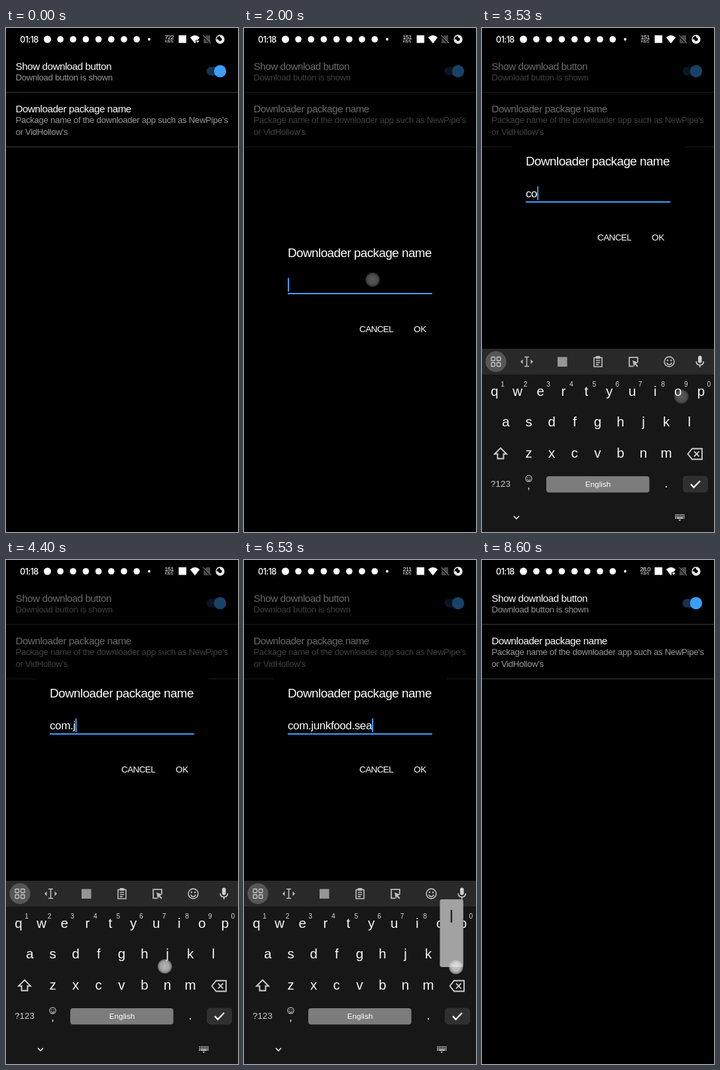
An HTML page with a canvas that plays this animation: 350x759 px, repeating every 8990 ms.

```html
<!DOCTYPE html>
<html lang="en">
<head>
<meta charset="utf-8">
<title>Downloader package name</title>
<style>
html, body { margin: 0; width: 100%; height: 100%; overflow: hidden; background: #000; }
canvas { display: block; width: 350px; height: 759px; }
</style>
</head>
<body>
<canvas id="stage"></canvas>
<script>
const W = 350, H = 759, LOOP = 8990, STEP = 1000 / 15;
const SANS = '"Liberation Sans", Arial, sans-serif';
const BLUE = '#3d9dfa';
const canvas = document.getElementById('stage');
const ctx = canvas.getContext('2d');
const dpr = window.devicePixelRatio || 1;
canvas.width = W * dpr;
canvas.height = H * dpr;

const clamp = v => Math.max(0, Math.min(1, v));
const easeOut = v => 1 - Math.pow(1 - clamp(v), 3);
const easeInOut = v => { v = clamp(v); return v * v * (3 - 2 * v); };

function text(str, x, y, size, color, { gap = 0, align = 'left', font = SANS, weight = 400 } = {}) {
  ctx.font = `${weight} ${size}px ${font}`;
  ctx.letterSpacing = gap + 'px';
  ctx.textAlign = align;
  ctx.fillStyle = color;
  ctx.fillText(str, x, y);
}
function rect(x, y, w, h, color, r = 0) {
  ctx.fillStyle = color;
  ctx.beginPath();
  ctx.roundRect(x, y, w, h, r);
  ctx.fill();
}
function circle(x, y, r, color) {
  ctx.fillStyle = color;
  ctx.beginPath();
  ctx.arc(x, y, r, 0, 7);
  ctx.fill();
}
function arc(x, y, r, from, to, color, width) {
  ctx.lineWidth = width;
  ctx.strokeStyle = color;
  ctx.beginPath();
  ctx.arc(x, y, r, from, to);
  ctx.stroke();
}
function shape(d, x, y, color, width = 0) {
  ctx.save();
  ctx.translate(x, y);
  ctx.lineWidth = width;
  ctx.strokeStyle = ctx.fillStyle = color;
  const path = new Path2D(d);
  width ? ctx.stroke(path) : ctx.fill(path);
  ctx.restore();
}

// Key centres
const PITCH = 34.6;
const keyPos = {};
[['qwertyuiop', 19, 547], ['asdfghjkl', 36, 593], ['zxcvbnm', 70.5, 640]].forEach(([row, x, y]) =>
  [...row].forEach((ch, i) => { keyPos[ch] = { x: x + i * PITCH, y }; }));
keyPos['.'] = { x: 278, y: 687 };

// Key, press time, release time, finger offset
const presses = [
  ['c', 3140, 3260, 2, 9], ['o', 3370, 3470, 5, 8], ['m', 3540, 3650, 0, 10], ['.', 3730, 3850, 2, 7],
  ['j', 4230, 4390, -4, 19], ['u', 4405, 4470, 0, 12], ['n', 4480, 4560, -2, 9], ['k', 4570, 4650, 2, 12],
  ['f', 5060, 5270, -4, 4], ['o', 5220, 5330, 7, 4], ['o', 5400, 5470, 7, 5], ['d', 5475, 5560, -2, 8],
  ['.', 5630, 5715, 2, 7], ['s', 5850, 5930, -2, 8], ['e', 5990, 6080, 2, 9], ['a', 6180, 6280, -11, 7],
  ['l', 6340, 6700, 7, 20]
].map(([ch, down, up, dx, dy]) => ({ ch, down, up, x: keyPos[ch].x + dx, y: keyPos[ch].y + dy }));

const taps = [
  { x: 53, y: 151, down: 1060, up: 1220 },
  { x: 194, y: 379, down: 1790, up: 1945 },
  { x: 280, y: 334, down: 7790, up: 7970 }
];

function touch({ x, y, down, up }, t) {
  if (t < down || t > up + 100) return;
  const a = t < up ? 1 : 1 - (t - up) / 100;
  const g = ctx.createRadialGradient(x, y, 0, x, y, 11.5);
  g.addColorStop(0, `rgba(240,240,240,${0.82 * a})`);
  g.addColorStop(0.62, `rgba(225,225,225,${0.76 * a})`);
  g.addColorStop(0.85, `rgba(200,200,200,${0.62 * a})`);
  g.addColorStop(1, 'rgba(180,180,180,0)');
  circle(x, y, 11.5, g);
}

function statusBar(t) {
  text('01:18', 21, 21.5, 12.8, '#fff', { gap: -0.6, font: 'Inter, sans-serif', weight: 500 });
  circle(62.5, 17, 5.5, '#fff');
  for (let i = 0; i < 7; i++) circle(82 + i * 19.2, 17, 4.8, '#fff');
  circle(216, 17, 1.9, '#fff');

  const speed = t < 1930 ? '722' : t < 4930 ? '151' : t < 7990 ? '211' : '28.0';
  text(speed, 246, 17, 9.4, '#fff', { align: 'center', gap: -0.7 });
  text('KB/S', 246, 22.4, 5.8, '#eee', { align: 'center', gap: -0.2 });

  rect(260.5, 11, 11.5, 11.5, '#fff');

  shape('M0 6.2 L-7.2 -2.8 Q0 -9.2 7.2 -2.8 Z', 285, 17, '#fff');
  const active = t < 395 || (t > 530 && t < 730) || (t > 3330 && t < 3530) || t > 8190;
  if (active) {
    rect(286, 18, 6.5, 6, '#000');
    shape('M-2.6 -2 H2.6 L0 1.6 Z', 289, 21, '#fff');
  }

  shape('M-5 -1 L-0.5 -6 H5 V6 H-5 Z', 303, 17, '#484848');
  shape('M-6 -5.5 L5.5 6.5', 303, 17, '#000', 2.4);
  shape('M-5.5 -6 L6 6', 303, 17, '#777', 1.1);

  arc(323, 17, 6, 0, 7, '#fff', 1.3);
  arc(323, 17, 4, -1.57, 3.1, '#fff', 2.6);
}

function settings() {
  const title = { gap: -0.46 }, sub = { gap: -0.32 };
  text('Show download button', 14.5, 62.8, 15.2, '#fff', title);
  text('Download button is shown', 14.5, 78.5, 13.2, '#979797', sub);
  text('Downloader package name', 14.5, 126.8, 15.2, '#fff', title);
  text("Package name of the downloader app such as NewPipe's", 14.5, 143, 13.2, '#979797', sub);
  text("or VidHollow's", 14.5, 160.5, 13.2, '#979797', sub);
  rect(0, 96.3, W, 1.5, '#2c2c2c');
  rect(0, 178.3, W, 1.5, '#2c2c2c');
  rect(302.5, 58.5, 26, 13, '#173350', 6.5);
  circle(323, 65, 9.2, BLUE);
}

function dialog(t) {
  const show = easeOut((t - 1200) / 330) * (1 - easeInOut((t - 7940) / 260));
  if (show <= 0) return;
  rect(0, 34, W, H - 34, `rgba(0,0,0,${0.58 * show})`);

  const zoom = 0.92 + 0.08 * show;
  const drop = 138 * (1 - easeInOut((t - 2130) / 340));
  ctx.save();
  ctx.globalAlpha = show;
  ctx.translate(175, 262 + drop);
  ctx.scale(zoom, zoom);
  ctx.translate(-175, -262);
  rect(45, 172, 261, 180, '#000', 2);
  text('Downloader package name', 66, 207, 18.8, '#fff', { gap: -0.51 });
  text('CANCEL', 174, 320, 13.5, '#fff', { gap: -0.6 });
  text('OK', 256, 320, 13.5, '#fff', { gap: -0.3 });
  rect(66, 261, 218, 2, BLUE);

  const typed = presses.filter(p => t >= p.up);
  const value = typed.map(p => p.ch).join('');
  text(value, 66, 255, 17, '#fff', { gap: -0.39 });
  const end = 66 + ctx.measureText(value).width;
  const last = typed.length ? typed[typed.length - 1].up : t < 2100 ? 1660 : 2100;
  if (Math.floor((t - last + 40) / 470) % 2 === 0) rect(end, 238.5, 2, 20.5, BLUE);
  ctx.restore();
}

function smiley(x, y, r, width) {
  const color = '#c0c0c0';
  arc(x, y, r, 0, 7, color, width);
  circle(x - r * 0.36, y - r * 0.27, r * 0.16, color);
  circle(x + r * 0.36, y - r * 0.27, r * 0.16, color);
  arc(x, y + r * 0.1, r * 0.5, 0.2, 2.94, color, width);
}

function toolbar() {
  const y = 502.5, grey = '#bdbdbd';
  rect(0, 483, W, 39.5, '#292929');
  circle(21, y, 15.7, '#565656');
  for (const dx of [-7, 1.5]) for (const dy of [-7, 1.5])
    shape('M1 0 H4.5 Q5.5 0 5.5 1 V4.5 Q5.5 5.5 4.5 5.5 H1 Q0 5.5 0 4.5 V1 Q0 0 1 0 Z', 21 + dx, y + dy, '#c8c8c8', 1.3);
  shape('M-3.5 -7 H3.5 M-3.5 7 H3.5 M0 -7 V7', 67.5, y, grey, 1.6);
  shape('M-6 -3.5 L-9.5 0 L-6 3.5 Z M6 -3.5 L9.5 0 L6 3.5 Z', 67.5, y, grey);
  rect(114, 495.5, 14.5, 14.5, '#969696');
  shape('M-6 -6 H6 V7.5 H-6 Z M-3.2 -2 H3.2 M-3.2 1.2 H3.2 M-3.2 4.4 H1', 175, y, grey, 1.6);
  rect(171.5, 494, 7, 4, grey, 1);
  shape('M6.3 1 V-6.3 H-6.3 V6.8 H0', 228.5, y, grey, 1.8);
  shape('M-1.5 -2 L7.2 1.2 L3.8 3 L7.2 6.4 L5.6 8 L2.2 4.6 L0.6 7.6 Z', 228.5, y, grey);
  smiley(282.5, y, 7.4, 1.6);
  rect(326, 493.5, 5.6, 11, '#d0d0d0', 2.8);
  shape('M-5.5 0 Q-5.5 5.5 0 5.5 Q5.5 5.5 5.5 0 M0 5.5 V9', 328.8, 502, '#d0d0d0', 1.6);
}

function keys() {
  rect(0, 522.5, W, H - 522.5, '#171717');
  const mid = { align: 'center' };
  for (const ch in keyPos)
    if (ch !== '.') text(ch, keyPos[ch].x, keyPos[ch].y + 7, 20.5, '#f6f6f6', mid);
  [...'1234567890'].forEach((d, i) => text(d, 31 + i * PITCH, 539.5, 10.2, '#d8d8d8', mid));

  shape('M0 -8.5 L9 0.5 H4.5 V7.5 H-4.5 V0.5 H-9 Z', 28, 641, '#d0d0d0', 1.9);
  shape('M-11 0 L-4.5 -8 H10.5 V8 H-4.5 Z M-1.5 -3.8 L6 3.8 M6 -3.8 L-1.5 3.8', 321.5, 641.5, '#d0d0d0', 1.8);

  text('?123', 28, 690.5, 13.4, '#cacaca', mid);
  smiley(70.5, 678.5, 4.6, 1.2);
  text(',', 70.5, 694, 16, '#f0f0f0', mid);
  rect(97, 675, 155.5, 24.5, '#7c7c7c', 4);
  text('English', 175, 691, 11.8, '#fff', mid);
  text('.', 278, 692, 18, '#f0f0f0', mid);
  rect(303, 674.5, 38, 25, '#303030', 5);
  shape('M-7 0 L-2.5 4.8 L7 -5', 322, 687, '#fff', 2.3);
}

function navStrip() {
  rect(0, 708, W, H - 708, '#171717');
  shape('M-4 -2 L0 2 L4 -2', 52, 737, '#e6e6e6', 1.7);
  for (let r = 0; r < 3; r++)
    for (let c = 0; c < 6; c++) rect(291.3 + c * 2.5, 732.5 + r * 2.4, 1.6, 1.6, '#e0e0e0');
  rect(294, 737.3, 8.5, 1.6, '#e0e0e0');
  shape('M-2 0 H2 L0 2 Z', 298.2, 740.6, '#e0e0e0');
}

function preview(p, t) {
  if (t < p.down || t >= p.up) return;
  const { x, y } = keyPos[p.ch];
  rect(x - 17.3, y - 82, 35.3, 102, '#a2a2a2', 3);
  text(p.ch, x, y - 47, 26, '#202020', { align: 'center' });
}

function keyboard(t) {
  if (t < 2130 || t > 8400) return;
  const rise = 276 * (1 - easeOut((t - 2070) / 400));
  const fall = 276 * easeInOut((t - 7960) / 420);
  ctx.save();
  ctx.translate(0, fall);
  ctx.save();
  ctx.beginPath();
  ctx.rect(0, 0, W, 708.5);
  ctx.clip();
  ctx.translate(0, rise);
  toolbar();
  keys();
  ctx.restore();
  navStrip();
  presses.forEach(p => preview(p, t));
  ctx.restore();
}

function draw(now) {
  const t = Math.floor((now % LOOP + 5) / STEP) * STEP;
  ctx.setTransform(dpr, 0, 0, dpr, 0, 0);
  rect(0, 0, W, H, '#000');
  settings();
  dialog(t);
  statusBar(t);
  keyboard(t);
  taps.concat(presses).forEach(p => touch(p, t));
}

const start = performance.now();
function tick() {
  draw(performance.now() - start);
  requestAnimationFrame(tick);
}
tick();
</script>
</body>
</html>
```
